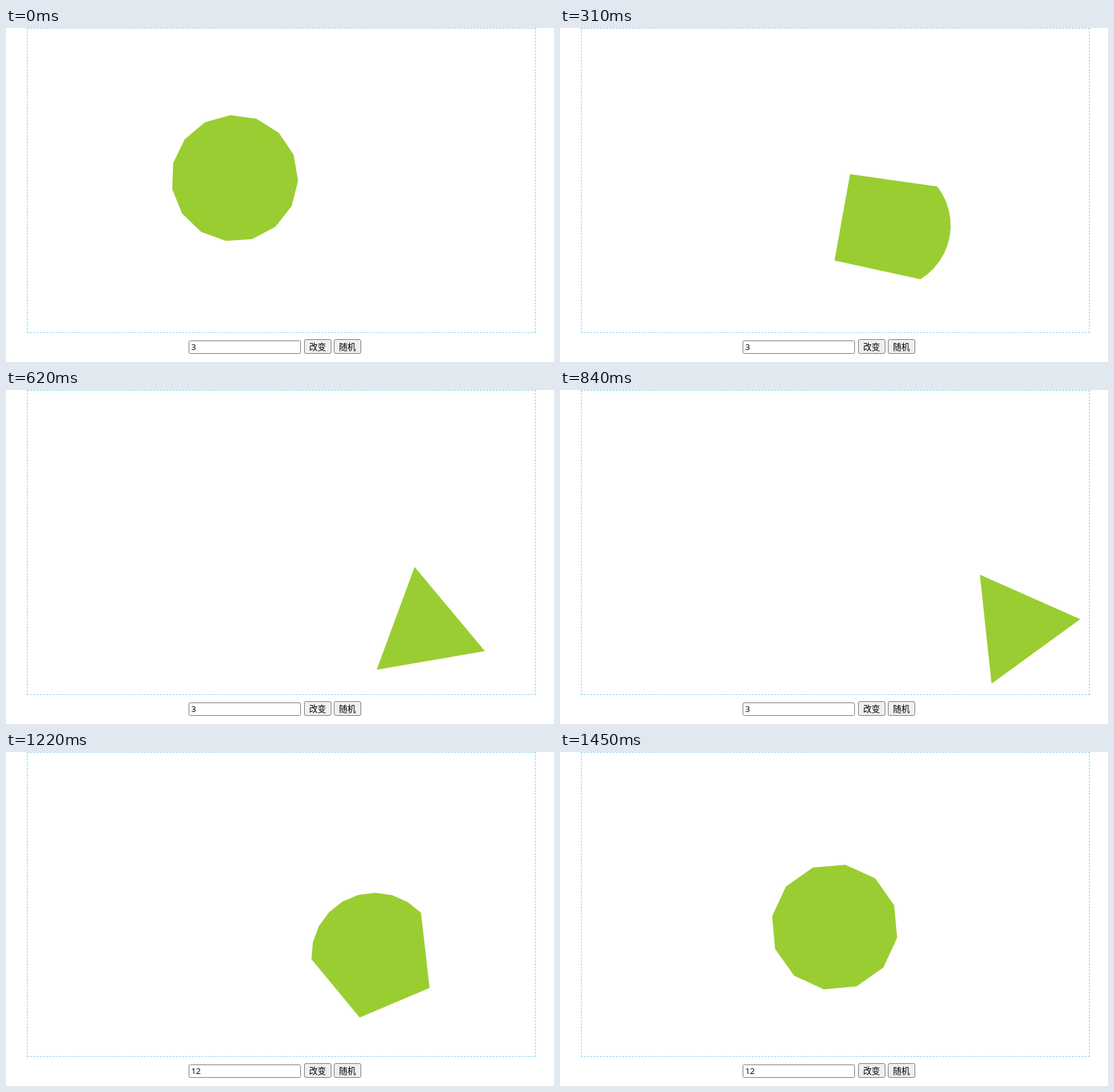
An HTML page that plays this animation: 864x528 px, repeating every 1.53 s.

```html
<!DOCTYPE html>
<html lang="zh">
<head>
<meta charset="utf-8">
<style>
  html, body { margin: 0; width: 100%; height: 100%; overflow: hidden; background: #fff; }
  #box { position: absolute; left: 33px; top: 0; width: 802px; height: 482px;
         box-sizing: border-box; border: 1px dashed skyblue; }
  svg { position: absolute; left: 0; top: 0; }
  rect { stroke: #767676; }
  text { font: 13.333px "Noto Sans CJK SC", "Noto Sans CJK", sans-serif; }
  #value { font-family: "Open Sans", sans-serif; }
</style>
</head>
<body>
<div id="box"></div>
<svg width="864" height="528" viewBox="0 0 864 528">
  <polygon id="shape" fill="yellowgreen"/>
  <rect x="288.5" y="494.5" width="176" height="20" rx="2" fill="#fff"/>
  <text id="value" x="292" y="509">3</text>
  <rect x="470.5" y="492.5" width="42" height="22" rx="2.5" fill="#efefef"/>
  <text x="478" y="509">改变</text>
  <rect x="517.5" y="492.5" width="42" height="22" rx="2.5" fill="#efefef"/>
  <text x="525" y="509">随机</text>
</svg>
<script>
const LOOP = 1530, STEPS = 20, RADIUS = 100;
const MORPH = 412, FIRST = 36, SECOND = 937;

// Straight legs of the flight; the shape bounces off the floor and the right wall.
const keys = [
  { t: 0,    x: 360.6, y: 237.5, turn: 98.1 },
  { t: 150,  x: 438.8, y: 275.2, turn: 78.2 },
  { t: 600,  x: 655.8, y: 378.7, turn: 22.6 },
  { t: 840,  x: 720.9, y: 372.9, turn: -6.1 },
  { t: 1070, x: 621,   y: 334.8, turn: -33.3 },
  { t: 1450, x: 433,   y: 276.7, turn: -80.2 }
];
const shape = document.getElementById('shape');
const value = document.getElementById('value');
const mix = (a, b, p) => a + (b - a) * p;
const clamp = p => Math.max(0, Math.min(1, p));

function pose(t) {
  const next = Math.max(1, keys.findIndex(k => k.t >= t));
  const a = keys[next - 1], b = keys[next];
  const p = clamp((t - a.t) / (b.t - a.t));
  return { x: mix(a.x, b.x, p), y: mix(a.y, b.y, p), turn: mix(a.turn, b.turn, p) };
}

// Vertices missing from the smaller polygon gather at its closing corner.
function corners(from, to, p) {
  const angle = (i, n) => Math.min(i, n) * 360 / n;
  return Array.from({ length: Math.max(from, to) },
    (_, i) => mix(angle(i, from), angle(i, to), p));
}

// Even steps, rounded up to 10 ms; the first one is short.
const stepTime = k => 10 * Math.min(8 * k - 1, Math.ceil(7.636 * k - 0.085));

function held(t) {
  let k = STEPS - 1;
  while (k > 0 && stepTime(k) > t) k--;
  return Math.max(0, stepTime(k));
}

function draw(t) {
  const { x, y, turn } = pose(t);
  const later = t >= SECOND;
  const angles = later
    ? corners(3, 12, clamp((t - SECOND) / MORPH))
    : corners(15, 3, clamp((t - FIRST) / MORPH));
  shape.setAttribute('points', angles.map(a => {
    const r = (a + turn) * Math.PI / 180;
    return (x + RADIUS * Math.cos(r)).toFixed(2) + ',' + (y + RADIUS * Math.sin(r)).toFixed(2);
  }).join(' '));
  value.textContent = later ? '12' : '3';
}

const start = performance.now();
function loop() {
  draw(held((performance.now() - start) % LOOP));
  requestAnimationFrame(loop);
}
loop();
</script>
</body>
</html>
```
